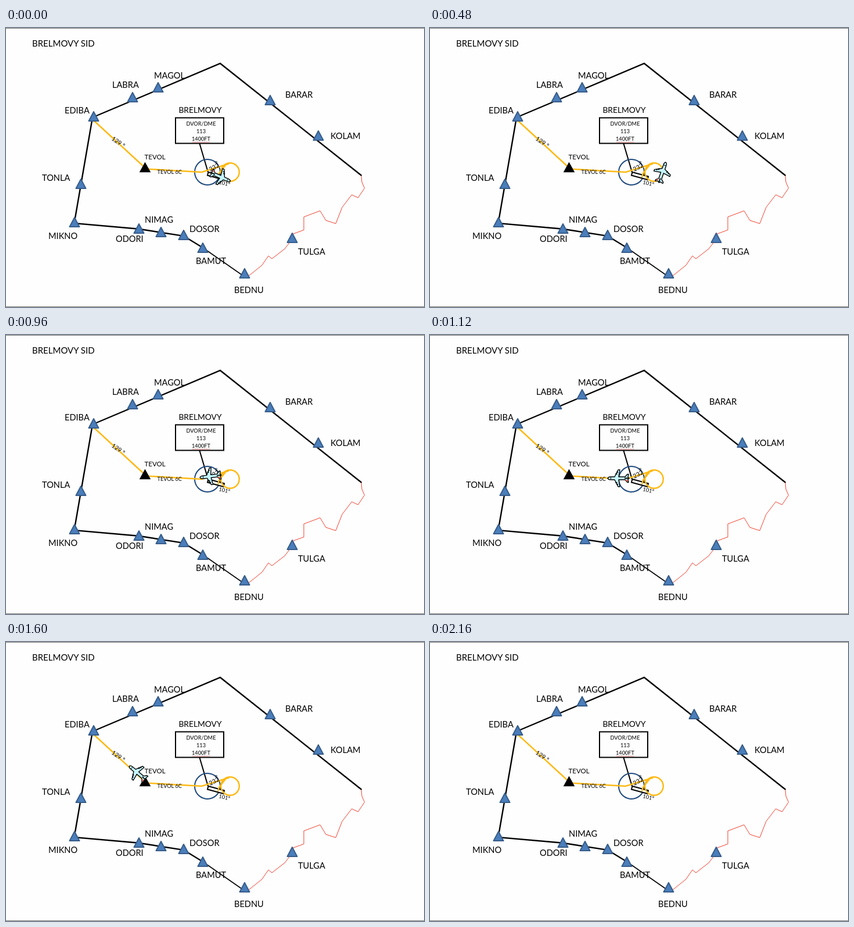
These frames come from a looping animation (720 by 480 pixels, 2.24 s). An HTML page:

```html
<!DOCTYPE html>
<html lang="en">
<head>
<meta charset="utf-8">
<title>Departure route</title>
<style>
  html, body { margin: 0; width: 100%; height: 100%; overflow: hidden; background: #fefefe; }
  svg { display: block; width: 720px; height: 480px; font-family: Lato, Carlito, sans-serif; }
  path, circle { fill: none; stroke: #000; stroke-width: 2.4; }
  .route { stroke: #fdb913; }
  .fix { fill: #4a7ebb; stroke: #385d8a; stroke-width: 2; stroke-linejoin: round; }
  .small { font-size: 9.2px; }
  .mid { text-anchor: middle; }
  #plane path { fill: #c4f6ff; stroke-width: 1.4; stroke-linejoin: round; }
</style>
</head>
<body>
<svg viewBox="0 0 720 480">
  <path d="M0 .5H720M0 479.5H720" style="stroke:#777;stroke-width:1"/>

  <!-- area boundary -->
  <path d="M612.5 254L369 61L151 153M148.500 157L117.500 336L229 345.800L306 357.800L339 378"/>
  <path d="M339 378L411 428" style="stroke-width:1.6"/>
  <path d="M612 254L613 265L617.500 275.500L606.500 292L595.500 287L579 308.500L568 336.500L551 331L541 314.500L513 325L513 347.500L495 354L487 371L480 380L458 397L452 392L441 408L418 426.500L411 428" style="stroke:#f04030;stroke-width:1"/>

  <!-- station and runway -->
  <path d="M292 154.500H375V198.500H292zM333.500 199L348 248" style="stroke-width:2"/>
  <circle cx="347" cy="248" r="22" style="stroke:#1f497d;stroke-width:2"/>
  <path d="M348.500 248L376 255.500L374.500 261L347 253.500z" style="fill:#fff;stroke-width:2"/>

  <!-- departure track -->
  <path class="route" d="M151.500 159.500L239.500 240.500M240 242.500L337 248L384 233.500M365 257L367 250L378 236"/>
  <circle class="route" cx="386" cy="248" r="15.800"/>

  <g id="fixes" font-size="14.600"></g>
  <path d="M239.500 232L248 247.500H231z" style="fill:#000;stroke-width:1.5"/>

  <text x="45" y="32" font-size="15">BRELMOVY SID</text>
  <text x="334.500" y="146" font-size="13.800" class="mid">BRELMOVY</text>
  <text x="238.500" y="226" font-size="11.500">TEVOL</text>
  <text x="260.500" y="251" class="small">TEVOL 6C</text>
  <g class="small mid">
    <text x="336" y="168">DVOR/DME</text>
    <text x="336" y="181">113</text>
    <text x="336" y="194">1400FT</text>
  </g>
  <path d="M321 196.500q1 -2 2 0t2 0t2 0t2 0t2 0t2 0t2 0t2 0t2 0t2 0t2 0t2 0t2 0t2 0t2 0" style="stroke:#e33;stroke-width:.7"/>
  <g font-size="10.500">
    <text transform="translate(181 192) rotate(35)">129 °</text>
    <text transform="translate(352 247) rotate(-28)">232</text>
    <text transform="translate(363 237) rotate(-28)">°</text>
    <text transform="translate(366 268) rotate(13)" font-size="9.200">101°</text>
  </g>

  <!-- aircraft, nose to the right -->
  <g id="plane">
    <path d="M19 0Q18 -2.500 14 -2.500H7L1 -14.500H-2L0 -2.500H-11L-15 -7H-17L-16 -2L-18 0L-16 2L-17 7H-15L-11 2.500H0L-2 14.500H1L7 2.500H14Q18 2.500 19 0z"/>
    <path d="M5.500 -7.500H2.500M5.500 7.500H2.500M3.500 -10.500H1M3.500 10.500H1M-18 0H-10" style="stroke-width:1.8"/>
    <path d="M13.500 -1.500V1.500" style="stroke-width:1"/>
    <path d="M-16 -5L-12 -3" style="stroke:#e0604c;stroke-width:2"/>
  </g>
</svg>
<script>
const STEP = 80, STEPS = 28;

// name, marker x y, label x y
const fixes = [
  ["LABRA", 218, 119, 183, 103], ["MAGOL", 262, 102, 255, 87],
  ["EDIBA", 151, 152, 101, 147], ["TONLA", 129, 268, 62, 263],
  ["MIKNO", 118, 334, 73, 363], ["ODORI", 229, 345, 189, 368],
  ["NIMAG", 267, 351, 239, 335], ["DOSOR", 306, 356, 316, 351],
  ["BAMUT", 339, 378, 327, 406], ["BEDNU", 411, 422, 393, 456],
  ["TULGA", 493, 361, 503, 390], ["KOLAM", 538, 185, 559, 191],
  ["BARAR", 455, 124, 481, 120]
];
document.getElementById("fixes").innerHTML = fixes.map(([name, x, y, tx, ty]) =>
  `<path class="fix" d="M${x} ${y - 8}l8.500 16h-17z"/><text x="${tx}" y="${ty}">${name}</text>`).join("");

// step, x, y, heading in degrees
const keys = [
  [0, 369, 256, 24], [3, 388, 262, 0], [6, 400, 249, -71], [9, 393.5, 235.5, -160],
  [10, 381, 235, -195], [13, 339, 247, -183], [14, 325, 246.5, -180],
  [18.6, 240, 241, -177], [19.4, 234, 232, -140], [20, 227, 225.5, -140],
  [24, 185, 189.5, -140], [27, 154, 162, -140]
];
const plane = document.getElementById("plane");

function draw(now) {
  const step = Math.floor(now / STEP) % STEPS;
  const i = keys.findIndex(k => k[0] > step);
  plane.style.display = i < 0 ? "none" : "";
  if (i > 0) {
    const a = keys[i - 1], b = keys[i], u = (step - a[0]) / (b[0] - a[0]);
    const [, x, y, turn] = a.map((v, j) => v + (b[j] - v) * u);
    plane.setAttribute("transform", `translate(${x} ${y}) rotate(${turn})`);
  }
  requestAnimationFrame(draw);
}
requestAnimationFrame(draw);
</script>
</body>
</html>
```
